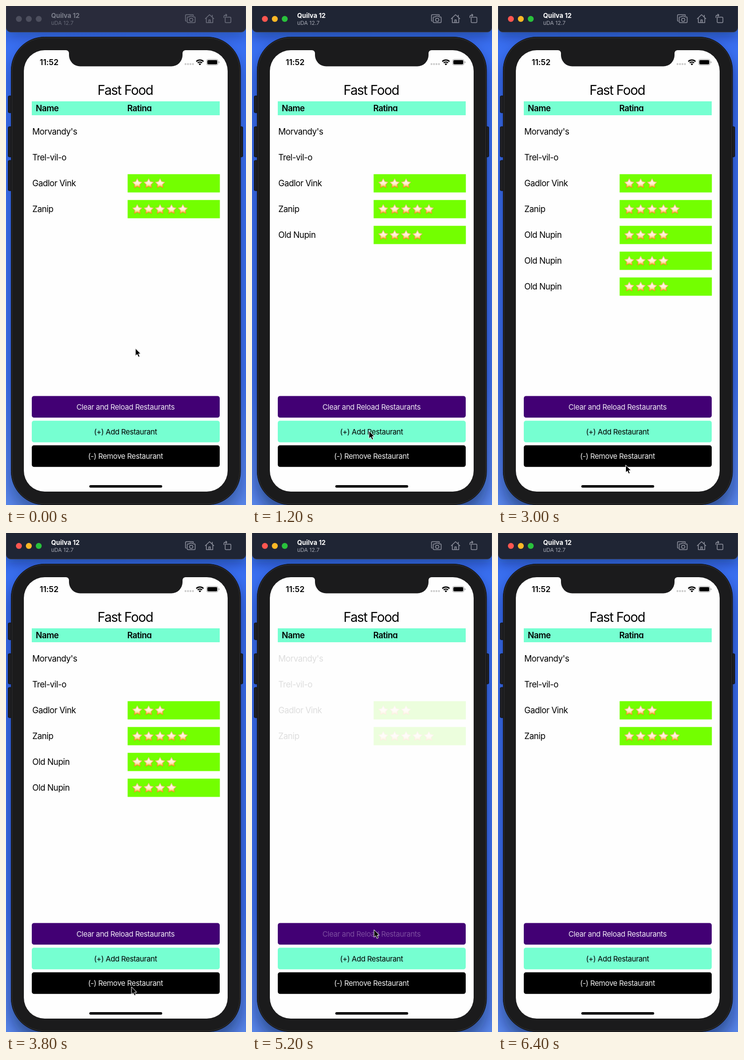
An HTML page that plays this animation: 484 by 1005 pixels, repeating every 6800 ms.

```html
<!DOCTYPE html>
<html lang="en">
<head>
<meta charset="utf-8">
<style>
  html, body { margin: 0; width: 100%; height: 100%; overflow: hidden; background: #3463d8; }
  svg { display: block; width: 100%; height: 100%; }
  text { font-family: Inter, "Open Sans", sans-serif; font-optical-sizing: none; }
  .row, .head { font-size: 17px; letter-spacing: -.5px; }
  .head, .time { font-weight: 600; }
  .time { font-size: 16px; letter-spacing: -.1px; }
  .title { font-size: 26.5px; letter-spacing: -1.2px; }
  .btn { font-size: 15px; letter-spacing: -.4px; }
  .mid { text-anchor: middle; }
  .bar { fill: #1f2534; }
  .name { font-size: 13px; font-weight: 700; fill: #fff; }
  .sub { font-size: 11px; fill: #a3a6b1; }
  .icons { fill: none; stroke: #8d909c; stroke-width: 1.5; stroke-linejoin: round; }
  .idle .bar { fill: #292b3b; }
  .idle .name { fill: #7b7e8b; }
  .idle .sub { fill: #676a78; }
  .idle .icons { stroke: #6c6f7d; }
  .idle .lights circle { fill: #4d4f5e; }
  .idle .shade { opacity: .35; }
</style>
</head>
<body>
<svg id="stage" viewBox="0 0 484 1005" preserveAspectRatio="none">
  <defs>
    <linearGradient id="sky" x2="0" y2="1">
      <stop stop-color="#3970f3"/><stop offset=".75" stop-color="#3f73f0"/><stop offset="1" stop-color="#5987ea"/>
    </linearGradient>
    <linearGradient id="gold" x2="0" y2="1">
      <stop offset=".2" stop-color="#fff8ee"/><stop offset=".6" stop-color="#fff0c8"/><stop offset="1" stop-color="#ffb02c"/>
    </linearGradient>
    <linearGradient id="rim" x2="0" y2="1">
      <stop stop-color="#f3c68c"/><stop offset=".5" stop-color="#f6b265"/><stop offset="1" stop-color="#f58a1e"/>
    </linearGradient>
    <filter id="blur" x="-20%" y="-20%" width="140%" height="140%"><feGaussianBlur stdDeviation="14"/></filter>
    <clipPath id="headClip"><path d="M52 192H431V212H52Z"/></clipPath>
    <path id="star" fill="url(#gold)" stroke="url(#rim)" stroke-width="1.2" stroke-linejoin="round"/>
  </defs>

  <path fill="url(#sky)" d="M0 0H484V1005H0Z"/>
  <g class="shade" fill="#000a30" opacity=".45" filter="url(#blur)">
    <path d="M0 0H484V60H0Z"/>
    <rect x="10" y="80" width="464" height="945" rx="66"/>
  </g>

  <rect class="bar" x=".5" y="-12" width="483" height="64.500" rx="9" stroke="#3a3e4e"/>
  <g class="lights">
    <circle cx="26" cy="26" r="6" fill="#fe5650"/>
    <circle cx="46" cy="26" r="6" fill="#fcb826"/>
    <circle cx="66" cy="26" r="6" fill="#29c23c"/>
  </g>
  <text class="name" x="91" y="24">Quilva 12</text>
  <text class="sub" x="91" y="38">uDA 12.7</text>
  <g class="icons">
    <path d="M364 30.5H363.5Q362 30.5 362 29V19Q362 17.5 363.5 17.5H376.5Q378 17.5 378 19V20"/>
    <path d="M367 22H369.5L371 20.5H376L377.5 22H380Q381.5 22 381.5 23.5V32Q381.5 33.5 380 33.5H367Q365.5 33.5 365.5 32V23.5Q365.5 22 367 22Z"/>
    <circle cx="373.5" cy="27.7" r="3.3"/>
    <path d="M401.5 26L410.5 17.5L419.5 26M404 24V33.5H417V24M409 33V28H412V33M416 18V22"/>
    <rect x="442" y="22.5" width="11.5" height="11" rx="1.5"/>
    <path d="M439.5 24V21.5Q439.5 18.5 442.5 18.5H445M443 16L445.5 18.5L443 21"/>
  </g>

  <g fill="#202023" stroke="#0c0d12">
    <rect x="4.5" y="181" width="10" height="34" rx="2"/>
    <rect x="4.5" y="243" width="10" height="61" rx="2"/>
    <rect x="4.5" y="311" width="10" height="61" rx="2"/>
    <rect x="468" y="243" width="9.5" height="61" rx="2"/>
  </g>
  <rect x="10.5" y="62.5" width="462.5" height="942" rx="67" fill="#1b1b1c" stroke="#0c0d10"/>
  <rect x="12" y="64" width="459.5" height="939" rx="65.5" fill="none" stroke="#343436"/>
  <rect x="36" y="89" width="411" height="889" rx="42" fill="#fefefe"/>
  <path fill="#1b1b1c" d="M121 88V89A6 6 0 0 1 127 95V99A22.500 22.500 0 0 0 149.500 121.500H333.500A22.500 22.500 0 0 0 356 99V95A6 6 0 0 1 362 89V88Z"/>

  <text class="time" x="68" y="119">11:52</text>
  <g fill="#c9c9c9">
    <circle cx="362" cy="117" r="1.9"/><circle cx="367" cy="117" r="1.9"/>
    <circle cx="372" cy="117" r="1.9"/><circle cx="377" cy="117" r="1.9"/>
  </g>
  <path fill="none" stroke="#000" stroke-width="2.4" d="M383.8 111.8A10.2 10.2 0 0 1 398.2 111.8M386.6 114.7A6.3 6.3 0 0 1 395.4 114.7"/>
  <path d="M391 119.5L388.5 116.8A3.5 3.5 0 0 1 393.5 116.8Z"/>
  <rect x="404.5" y="107.5" width="23" height="11.5" rx="3.3" fill="none" stroke="#a0a0a0"/>
  <rect x="406" y="109" width="20" height="8.5" rx="2"/>
  <path fill="#a0a0a0" d="M428.8 111Q430.5 111.5 430.5 113.2T428.8 115.5Z"/>

  <text class="title mid" x="240.5" y="179">Fast Food</text>
  <path fill="#76ffd1" d="M52 192H431V220H52Z"/>
  <g class="head" clip-path="url(#headClip)">
    <text x="60" y="212">Name</text>
    <text x="244.5" y="212">Rating</text>
  </g>
  <g id="rows"></g>
  <g id="buttons"></g>
  <rect x="168" y="965" width="147" height="5" rx="2.5"/>
  <path id="cursor" d="M0 0V15.2L3.5 12L6 17.6L8.7 16.4L6.3 11H10.8Z" stroke="#fff"/>
</svg>

<script>
const LOOP = 6800, STEP = 200;
const $ = id => document.getElementById(id);

// name, stars
const rows = [["Morvandy's", 0], ["Trel-vil-o", 0], ["Gadlor Vink", 3], ["Zanip", 5],
              ["Old Nupin", 4], ["Old Nupin", 4], ["Old Nupin", 4]];
// label, top, fill, text colour, press times
const buttons = [
  ["Clear and Reload Restaurants", 785.5, "#420074", "#eee8f4", [5200]],
  ["(+) Add Restaurant", 835.3, "#76ffd1", "#000", [600, 1400, 2200]],
  ["(-) Remove Restaurant", 884.7, "#000", "#eee", [3200, 4000]]
];
// time, x, y of the pointer
const path = [[200, 261, 689.5], [600, 236, 856], [2600, 236, 856], [3000, 257.5, 924.5],
              [3200, 253, 914], [4000, 253, 914], [4400, 249, 866], [5000, 246, 799]];

const starPath = Array.from({ length: 10 }, (_, i) => {
  const r = i % 2 ? 5.1 : 9.7, a = (i / 5 - .5) * Math.PI;
  return (r * Math.cos(a)).toFixed(2) + " " + (r * Math.sin(a)).toFixed(2);
});
$("star").setAttribute("d", "M" + starPath.join("L") + "Z");

$("rows").innerHTML = rows.map(([name, stars], i) => {
  const y = 253 + 52 * i;
  let cell = "";
  if (stars) cell = `<rect x="245.3" y="${y - 18.3}" width="186" height="36.8" fill="#73ff00"/>`;
  for (let k = 0; k < stars; k++) cell += `<use href="#star" x="${264.7 + 23 * k}" y="${y + .8}"/>`;
  return `<g><text class="row" x="53" y="${y + 6}">${name}</text>${cell}</g>`;
}).join("");

$("buttons").innerHTML = buttons.map(([label, y, fill, ink]) =>
  `<rect x="52" y="${y}" width="379" height="43.5" rx="4.5" fill="${fill}"/>
   <text class="btn mid" x="241" y="${y + 27.5}" fill="${ink}">${label}</text>`).join("");
const labels = $("buttons").querySelectorAll("text");

const clamp = v => Math.max(0, Math.min(1, v));

function fade(t, start) {
  const p = clamp((t - start) / 400);
  return p < .5 ? 2 * p * p : 1 - 2 * (1 - p) ** 2;
}

function rowOpacity(i, t) {
  if (i < 4) return t < 5200 ? 1 : fade(t, 5100);
  if (t >= 5200) return 0;
  const shown = fade(t, [700, 1500, 2300][i - 4]);
  const gone = fade(t, [LOOP, 3900, 3300][i - 4]);
  return shown * (1 - gone);
}

function pressOpacity(times, t) {
  const last = times.filter(s => s <= t).pop();
  return last === undefined ? 1 : Math.min(1, .33 + .47 * (t - last) / 400);
}

function pointer(t) {
  const n = path.findIndex(p => p[0] > t);
  if (n === 0) return path[0].slice(1);
  if (n < 0) return path[path.length - 1].slice(1);
  const [a, b] = [path[n - 1], path[n]], k = (t - a[0]) / (b[0] - a[0]);
  return [a[1] + (b[1] - a[1]) * k, a[2] + (b[2] - a[2]) * k];
}

function draw(now) {
  const t = Math.floor(now % LOOP / STEP) * STEP;
  $("stage").classList.toggle("idle", t < 200);
  [...$("rows").children].forEach((g, i) => g.setAttribute("opacity", rowOpacity(i, t)));
  labels.forEach((l, i) => l.setAttribute("opacity", pressOpacity(buttons[i][4], t)));
  $("cursor").setAttribute("transform", `translate(${pointer(t)})`);
  $("cursor").setAttribute("opacity", t < 6200 ? 1 : 0);
}

const begin = performance.now();
function tick() {
  draw(performance.now() - begin);
  requestAnimationFrame(tick);
}
tick();
</script>
</body>
</html>
```
